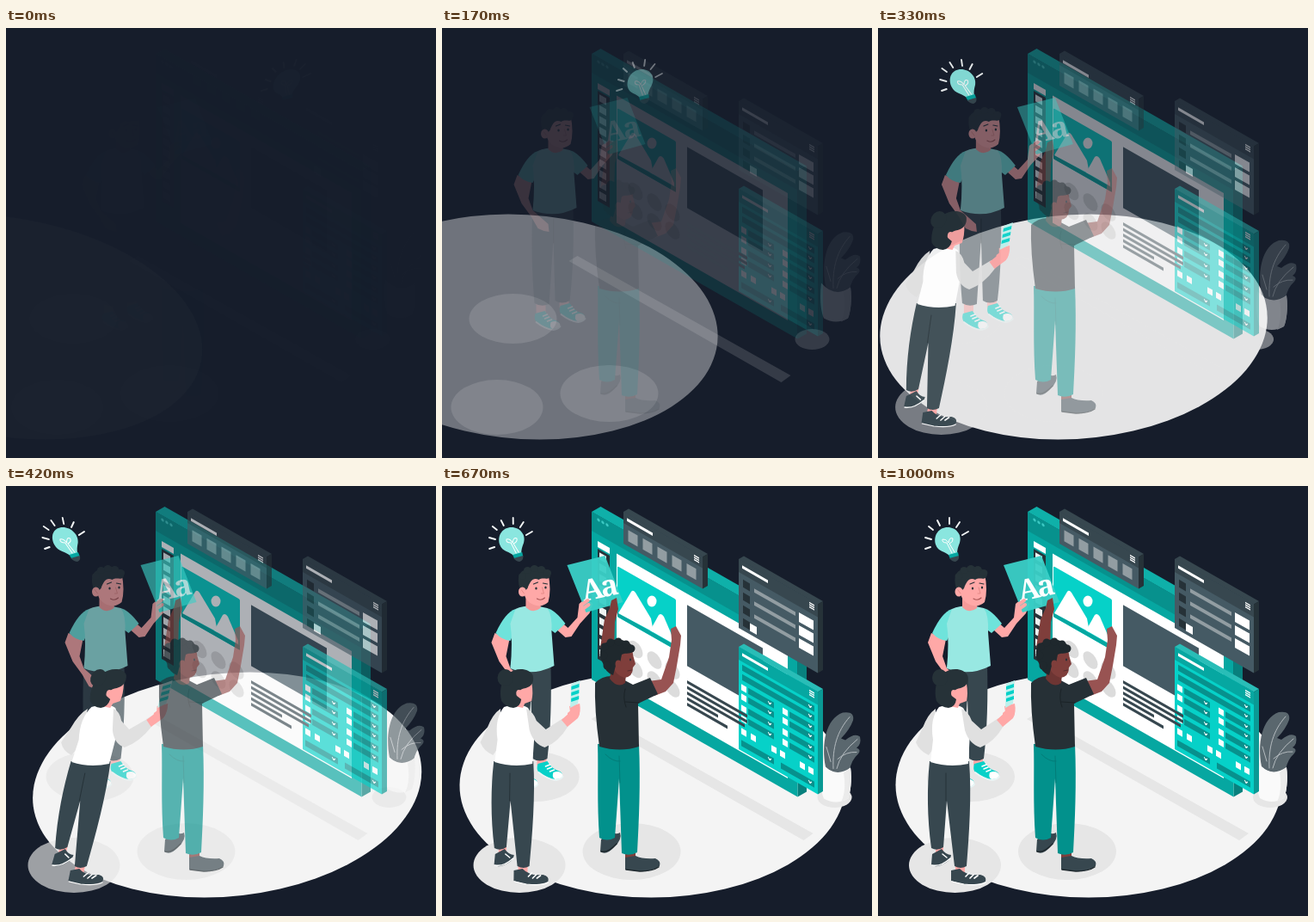
Recreate the animation shown at these times as an HTML page. Size 500x500 px, loop 1.04 s.

```html
<!DOCTYPE html>
<html lang="en">
<head>
<meta charset="utf-8">
<title>Design team</title>
<style>
  html, body { margin: 0; width: 100%; height: 100%; overflow: hidden; background: #161d2b; }
  svg { display: block; width: 100%; height: 100%; }
</style>
</head>
<body>
<svg id="stage" viewBox="0 0 500 500"></svg>
<script>
const LOOP = 1040, FRAME = 1000 / 24, SLOPE = .57;
const INK = '#263238', SLATE = '#37474f', STEEL = '#455a64', GREY = '#929da2';
const PINK = '#ffa8a7', BROWN = '#7f3e3b', TAN = '#985352';
const TEAL = '#06a7a1', DEEP = '#07918d', BRIGHT = '#06d1c8', MINT = '#98e8e2';

// Markup helpers
const path = (d, fill, extra = '') => `<path d="${d}" fill="${fill}" ${extra}/>`;
const line = (d, stroke, width = 1) =>
  path(d, 'none', `stroke="${stroke}" stroke-width="${width}" stroke-linecap="round" stroke-linejoin="round"`);
const rect = (x, y, w, h, fill, r = 0) =>
  `<rect x="${x}" y="${y}" width="${w}" height="${h}" rx="${r}" fill="${fill}"/>`;
const oval = (x, y, rx, ry, fill) => `<ellipse cx="${x}" cy="${y}" rx="${rx}" ry="${ry}" fill="${fill}"/>`;
const group = (id, body) => `<g id="${id}">${body}</g>`;
const repeat = (list, draw) => list.map(draw).join('');
const iso = (x, y, body) => `<g transform="matrix(1 ${SLOPE} 0 1 ${x} ${y})">${body}</g>`;

function slab(w, h, depth, front, top, side) {
  const up = -2 * SLOPE * depth;
  return path(`M0 0L${depth} ${up}H${w + depth}L${w} 0Z`, top) +
    path(`M${w} 0l${depth} ${up}v${h}L${w} ${h}Z`, side) + rect(0, 0, w, h, front);
}

const panelHeader = rect(4, 5, 30, 3.5, '#fff') +
  repeat([3, 5.5, 8], v => rect(82, v, 6, 1.5, '#fff'));

function monitor() {
  return iso(174, 30,
    slab(239.5, 195, 10.5, TEAL, '#0fb0a9', '#08807d') +
    rect(0, 0, 239.5, 22, DEEP) +
    repeat([8, 13, 18], u => oval(u, 5, 1.7, 1.7, '#3cc9c3')) +
    rect(7, 30, 14, 7, '#fff') + rect(7, 39, 14, 128, INK) +
    repeat([...Array(10).keys()], i => rect(9, 42 + i * 12.5, 8, 8, '#eef2f2')) +
    rect(29, 32, 199, 148, '#fff') +
    rect(30, 46, 68, 59, BRIGHT, 1.5) + rect(30, 100, 68, 5, TEAL) +
    rect(111, 45, 88, 71, STEEL) +
    repeat([[51, 131], [73, 131], [51, 154], [73, 154], [94, 131], [94, 152]],
      ([u, v]) => oval(u, v, 8.5, 9, '#dcdcdc'))) +
    path('M205 148L220 123Q222 120 225 124L243 154L246 170Z', '#fff') +
    path('M242 168L252 150Q255 147 258 152L270 180V184Z', '#fff') + oval(244, 134, 5.5, 6.5, '#fff');
}

const toolPanel = () => iso(211, 30,
  slab(92, 37, 6, STEEL, SLATE, INK) + rect(0, 0, 92, 13, SLATE) + panelHeader +
  repeat([0, 1, 2, 3, 4], i => rect(5.5 + 17 * i, 18, 11, 13, GREY)));

const listPanel = () => iso(345, 85,
  slab(92, 80, 6, STEEL, SLATE, INK) + rect(0, 0, 92, 15, SLATE) + panelHeader +
  repeat([0, 1, 2], i =>
    rect(5, 21 + 15 * i, 8, 9, INK) + rect(18, 24 + 15 * i, 48, 4.5, GREY) +
    rect(70, 22 + 15 * i, 17, 11, '#fff')) +
  rect(5, 66, 8, 9, INK) + rect(13, 67, 8, 9, '#fff'));

function formPanel() {
  const chevron = (u, v) => line(`M${u - 1.5} ${v - 1}l1.5 2l1.5 -2`, '#fff', 1.2);
  const bar = (u, v, end) => rect(u, v - 3.5, end - u, 7, DEEP) + chevron(end - 5, v);
  return iso(345, 187,
    slab(92, 119, 6, BRIGHT, '#29bdb7', '#0a9994') + rect(0, 0, 92, 15, TEAL) + panelHeader +
    bar(4, 22, 88) + bar(4, 33, 88) +
    repeat([45, 56, 69, 81], v =>
      rect(3, v - 3.5, 6, 7, '#fff') + bar(11, v, 41) + rect(51, v - 3.5, 6, 7, '#fff') + bar(59, v, 88)) +
    repeat([6, 17, 41, 51, 74, 84], u => rect(u - 3, 92.5, 6, 7, '#fff')) +
    bar(3, 110, 41) + bar(49, 110, 88)) +
    iso(285, 226, repeat([70, 70, 67, 36, 47], (w, i) => rect(0, 6.5 * i, w, 3.6, SLATE)));
}

const shadows = () =>
  path('M173 271L183 265L431 404L420 412Z', '#e6e6e6') +
  repeat([[108, 338, 51, 29], [89.5, 441, 53.5, 32], [220, 425, 57, 33], [456, 362, 20, 12]],
    ([x, y, rx, ry]) => oval(x, y, rx, ry, '#e6e6e6'));

const plant = () =>
  path('M446 326C441 300 446 270 466 263Q480 261 478 272Q474 283 464 293L469 295Q480 286 486 291Q488 300 482 304Q488 306 484 311Q476 318 474 330Q458 338 446 326Z', '#5a676e') +
  line('M455 328C454 304 459 285 474 268M459 328Q463 310 483 294M460 317Q470 308 482 309M452 320L447 303', '#b4bbbf') +
  path('M441 322Q457 340 475 327C477 341 475 357 472 363Q458 371 444 363C440 354 439 337 441 322Z', '#fafafa') +
  path('M467 333L475 327C477 341 475 357 472 363L464 367C469 357 469 345 467 333Z', '#ebebeb');

const sneaker = (x, y, fill) => `<g transform="translate(${x} ${y})">` +
  path('M1 3L12 0Q17 9 27 12Q31 15 29 19Q20 25 11 18L2 13Q-1 9 1 3Z', fill) +
  path('M19 13Q27 10 30 16Q30 21 21 21Q17 19 19 13Z', '#fff') +
  line('M10 6l5 -2M12 9l5 -2M15 12l5 -2', '#fff', 1.6) +
  line('M2 13Q12 21 22 22Q28 21 30 18', '#e9f5f5', 1.8) + '</g>';

function presenter() {
  return rect(84, 312, 11, 20, PINK) + rect(111, 308, 11, 17, PINK) +
    sneaker(82, 329, BRIGHT) + sneaker(111, 320, BRIGHT) +
    path('M80 208L127 208C128 245 127 285 123 317Q114 322 106 317L104 245L99 321Q90 325 82 320C79 285 78 245 80 208Z', SLATE) +
    line('M104 222V250', INK) +
    path('M62 171L79 178L75 198L80 212L98 228L99 237L93 236L86 233L78 219L67 204L58 182Z', PINK) +
    path('M124 158L139 158L147 165L158 153L160 137L168 130L176 137L172 148L161 160L151 175L144 176Z', PINK) +
    path('M86 143Q74 147 63 171Q70 179 80 180L90 159Z', '#6fe3db') +
    path('M122 142Q131 143 144 160L132 171L120 162Z', '#6fe3db') +
    path('M86 143Q102 136 123 142Q129 150 128 170L131 209Q106 222 80 212Q83 182 80 160Z', MINT) +
    path('M98 128L116 130L115 142Q106 149 98 141Z', '#f59a99') +
    path('M95 104L124 102Q128 121 124 135Q116 142 107 138Q96 134 95 119Z', PINK) +
    path('M91 119C87 106 91 98 99 97C107 91 121 94 127 102C126 112 119 105 113 109C106 106 103 111 100 119L96 123Z', INK) +
    repeat([[94, 105], [100, 98], [108, 96], [116, 97], [123, 101]], ([x, y]) => oval(x, y, 4.5, 4, INK)) +
    oval(94, 123, 4.5, 5.5, PINK) + line('M93 121l3 4', '#e58a87') +
    oval(110, 119, 1.2, 1.5, INK) + oval(121, 118, 1.2, 1.5, INK) +
    line('M107 114l5 -2M118 113l5 1', INK, 1.2) + line('M117 118l2 7l-3 0', '#e58a87') +
    line('M111 131Q116 134 120 130', '#a95555', 1.1) +
    path('M146 92L190 81L211 135L168 147Z', '#3ad0c8', 'opacity=".95"') +
    `<text x="182" y="130" transform="rotate(-12 184 117)" text-anchor="middle" fill="#fff" font-family="'Noto Serif', serif" font-weight="700" font-size="34" letter-spacing="-3">Aa</text>` +
    line('M163 138L170 133M164 143L171 138', PINK, 4);
}

function photographer() {
  const shoe = (x, y) => path(`M${x} ${y}l10 -2q9 9 24 7q8 2 6 8q-8 4 -26 3l-14 -4z`, SLATE) +
    line(`M${x + 1} ${y + 13}l14 3q18 2 25 -2`, '#fff', 1.2);
  return rect(67, 416, 9, 12, PINK) + rect(90, 438, 11, 12, PINK) +
    path('M63 428L74 422Q79 429 85 429Q85 436 73 441Q65 444 62 440Z', SLATE) +
    line('M63 441Q73 443 84 433M75 428l5 4', '#fff', 1.5) +
    shoe(85, 447) + line('M102 454l4 -4M107 456l4 -4M112 456l4 -3', '#fff', 1.7) +
    path('M60 320L106 320C109 360 106 405 103 442Q96 446 89 442L80 366L76 420Q69 425 62 421C57 385 57 350 60 320Z', SLATE) +
    line('M79 334V366', INK) +
    path('M67 259Q58 265 52 281L44 298Q48 308 59 313L67 301Z', '#e0e0e0') +
    path('M71 257Q87 251 99 258Q106 269 107 286L105 323Q83 328 61 321L64 295Q60 270 71 257Z', '#fff') +
    path('M97 259Q105 262 109 273L120 283L140 270L146 279Q135 298 119 304Q106 300 101 284Z', '#e0e0e0') +
    path('M138 272L148 263L147 256L159 253Q161 263 157 270L145 280Z', PINK) +
    path('M149 230L159 226L157 253L148 258Z', '#bdf0ec') +
    repeat([233, 240, 247], y => path(`M149 ${y}l9 -3v4l-9 3z`, BRIGHT)) +
    path('M145 264Q151 259 154 256Q161 258 158 268L146 276Z', PINK) +
    path('M85 230L103 230Q105 241 103 250L95 253L93 258L83 256Z', PINK) +
    path('M68 250C65 239 67 226 75 219C83 211 99 211 104 220C106 228 103 233 96 235C89 236 86 240 87 245L91 248Q90 257 82 258Q73 257 68 250Z', INK) +
    oval(72, 223, 9, 10, INK) + oval(88, 241, 3, 4, PINK);
}

function builder() {
  return path('M184 188L189 155L195 142L197 133L203 130L205 143L201 158L200 190Z', BROWN) +
    rect(187, 402, 10, 14, BROWN) + rect(213, 423, 12, 15, BROWN) +
    path('M185 411L197 402Q202 406 207 403Q210 411 200 420Q191 430 184 425Z', SLATE) +
    path('M213 432L225 430Q233 434 248 433Q255 436 253 442Q244 449 229 448L213 446Z', SLATE) +
    line('M214 446L230 448Q245 448 252 443M185 425Q193 427 203 416', '#1f292e', 1.4) +
    path('M181 300L229 300C231 345 229 390 227 426Q218 431 209 427L206 340L201 409Q192 414 183 409C180 370 182 330 181 300Z', '#02918c') +
    line('M206 314L207 345M190 312Q199 321 207 320', '#027c78') +
    path('M240 227L255 225L264 199L267 179L266 166L272 163L278 174L277 185L273 209L269 229L260 239L247 244Z', TAN) +
    path('M178 229Q189 218 205 222L222 231L242 223L251 242L228 253L229 303Q207 310 183 303Q177 260 178 229Z', '#263036') +
    line('M213 251L229 252M213 236Q210 247 214 257', '#1b2327') +
    path('M198 205L214 219L213 229Q204 236 195 224Z', '#6d3533') +
    path('M200 190L221 190Q222 198 225 207L222 211Q222 222 212 223Q201 219 199 210Z', BROWN) +
    path('M187 206C181 194 184 184 193 181C204 175 221 181 224 190C220 197 214 193 209 196L207 206L202 209L199 220Q190 217 187 206Z', '#1f282d') +
    repeat([[189, 187], [196, 182], [205, 181], [214, 184], [220, 189], [188, 197], [192, 209]],
      ([x, y]) => oval(x, y, 4.5, 4.5, '#1f282d')) +
    oval(205, 207, 3.5, 4.5, BROWN) + oval(219, 202, 1, 1.4, INK) + line('M216 215l5 -1', '#572d2e');
}

const bulb = () =>
  line('M55 73L61 71M55 60L62 62M59 47L64 51M69 40L72 46M83 37V44M95 42L91 48M105 53L98 57', '#f3f6f6', 1.9) +
  path('M67 68C64 57 71 48 81 48C91 48 98 57 95 66C93 71 92 74 92 79L83 81C79 76 70 77 67 68Z', '#8ae6df') +
  line('M86 78L80 66Q74 66 75 62Q79 61 82 66Q83 59 87 61Q88 65 83 67L89 77', '#fff', 1) +
  path('M82 80L93 77L94 82L84 85Z', TEAL) + path('M83 84L94 81Q95 86 90 88Q86 88 83 84Z', SLATE);

const stage = document.getElementById('stage');
stage.innerHTML = rect(0, 0, 500, 500, '#161d2b') +
  group('floor', oval(245, 347.5, 224.5, 131, '#f4f4f4')) +
  group('shadows', shadows()) + group('plant', plant()) +
  group('monitor', monitor()) + group('tools', toolPanel()) +
  group('list', listPanel()) + group('form', formPanel()) +
  group('presenter', presenter()) + group('photographer', photographer()) +
  group('builder', builder()) + group('bulb', bulb());

// cubic-bezier(.36, -.01, .5, 1.38)
function ease(x) {
  if (x >= 1) return 1;
  const bezier = (a, b, s) => 3 * a * s * (1 - s) ** 2 + 3 * b * s * s * (1 - s) + s ** 3;
  let low = 0, high = 1;
  for (let i = 0; i < 24; i++) {
    const mid = (low + high) / 2;
    if (bezier(.36, .5, mid) < x) low = mid; else high = mid;
  }
  return bezier(-.01, 1.38, low);
}

function place(id, opacity, transform = '') {
  const el = document.getElementById(id);
  el.setAttribute('opacity', Math.max(0, Math.min(1, opacity)));
  el.setAttribute('transform', transform);
}

// Rush in from one side while leaning, then settle upright.
function rush(id, t, side, originY) {
  let move = 0, skew, opacity = 1;
  if (t < 600) {
    opacity = ease(t / 600);
    move = 250 * (1 - opacity);
    skew = 20 - 30 * opacity;
  } else if (t < 800) skew = -10 + 12 * ease((t - 600) / 200);
  else skew = 2 - 2 * ease((t - 800) / 200);
  place(id, opacity, `translate(${side * move} ${originY}) skewX(${-side * skew}) translate(0 ${-originY})`);
}

function render(time) {
  // Motion is sampled at 24 frames per second, with a held first frame.
  const frame = Math.floor((time % LOOP + 4) / FRAME);
  const t = frame < 2 ? 43 : frame * FRAME + 36;
  const shown = ease(t / 1000), slide = 30 * (1 - shown);
  rush('floor', t, -1, 347.5);
  rush('photographer', t, -1, 337);
  rush('bulb', t, 1, 62);
  place('shadows', shown, `translate(${-slide} 0)`);
  place('presenter', shown, `translate(${slide} 0)`);
  place('plant', shown, `translate(0 ${-slide})`);
  for (const id of ['monitor', 'tools', 'list', 'form', 'builder']) place(id, shown);
}

const start = performance.now();
function tick() {
  render(performance.now() - start);
  requestAnimationFrame(tick);
}
tick();
</script>
</body>
</html>
```
